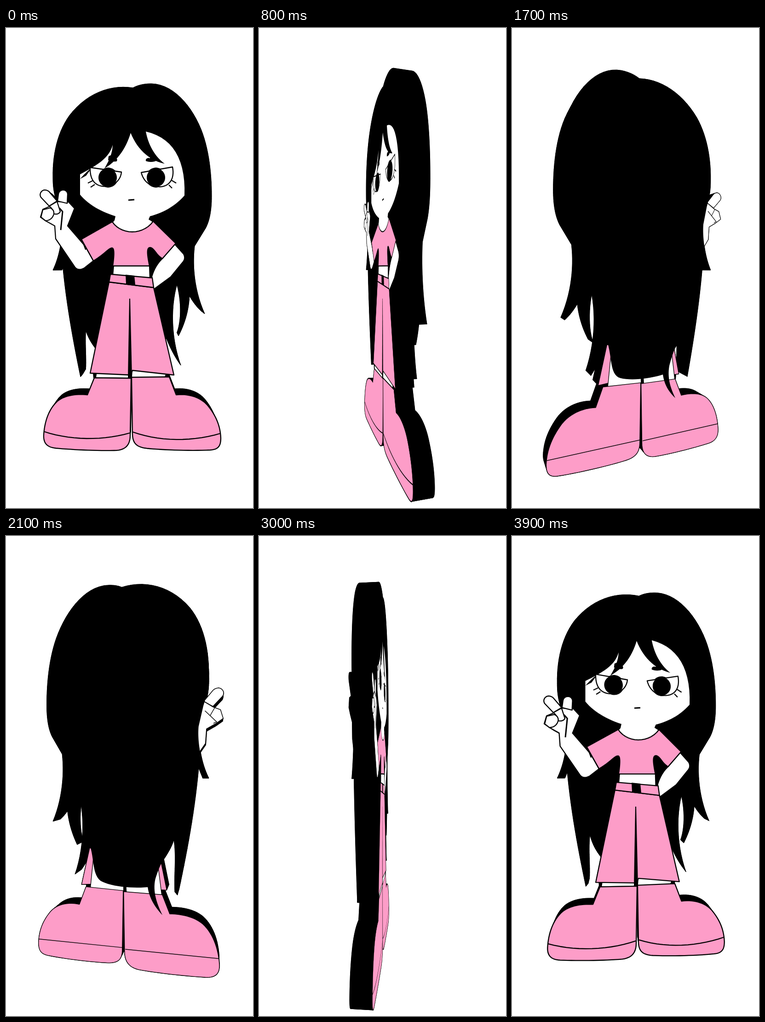
These frames come from a looping animation (537 by 1043 pixels, 4 s). An HTML page with a canvas:

```html
<!DOCTYPE html>
<html lang="en">
<head>
<meta charset="utf-8">
<title>Turntable girl</title>
<style>
  html, body { margin: 0; width: 100%; height: 100%; overflow: hidden; background: #fff; }
  canvas { display: block; }
</style>
</head>
<body>
<canvas width="537" height="1043"></canvas>
<script>
const canvas = document.querySelector('canvas');
const ctx = canvas.getContext('2d');
const W = 537, H = 1043, CX = W / 2, CY = H / 2;
const FOCAL = 768, DEPTH = 38;            // camera distance, thickness of the figure
const START = 2.6, STEP = 9.08;           // degrees, degrees per step
const FRAME_MS = 100, FRAMES = 40;
const PINK = '#fd9dc8', WHITE = '#fff', BLACK = '#000';
const LINE = 2.3, THIN = 1.3;

const pose = degrees => {
  const a = degrees * Math.PI / 180;
  return { cos: Math.cos(a), sin: Math.sin(a) };
};

function project([x, y], z, { cos, sin }) {
  const s = FOCAL / (FOCAL - x * sin - z * cos);
  return [CX + (x * cos - z * sin) * s, CY + y * s, s];
}

// Screen point at a known pose -> point on the flat plane at depth z.
function unproject([px, py], z, { cos, sin }) {
  const X = px - CX;
  const x = (X * (FOCAL - z * cos) + FOCAL * z * sin) / (FOCAL * cos + X * sin);
  return [x, (py - CY) * (FOCAL - x * sin - z * cos) / FOCAL];
}

const mix = (p, q, t) => [p[0] + (q[0] - p[0]) * t, p[1] + (q[1] - p[1]) * t];

function bezier(points, t) {
  while (points.length > 1) points = points.slice(1).map((q, i) => mix(points[i], q, t));
  return points[0];
}

// Turns absolute M, L, Q, C path data into a polyline.
function flatten(d) {
  const out = [];
  for (const [, cmd, args] of d.matchAll(/([MLQC])([^MLQC]*)/g)) {
    const n = args.trim().split(/[ ,]+/).map(Number);
    const size = { M: 1, L: 1, Q: 2, C: 3 }[cmd];
    const pts = [];
    for (let i = 0; i < n.length; i += 2) pts.push([n[i], n[i + 1]]);
    for (let i = 0; i < pts.length; i += size) {
      if (size === 1) { out.push(pts[i]); continue; }
      const curve = [out.at(-1), ...pts.slice(i, i + size)];
      for (let k = 1; k <= 14; k++) out.push(bezier(curve, k / 14));
    }
  }
  return out;
}

const frontPose = pose(START), backPose = pose(START + 17 * STEP);
const front = d => flatten(d).map(p => unproject(p, 0, frontPose));
const back = d => flatten(d).map(p => unproject(p, -DEPTH, backPose));

function circle(cx, cy, r) {
  const pts = Array.from({ length: 40 }, (_, i) => {
    const a = i * Math.PI / 20;
    return `${cx + r * Math.cos(a)} ${cy + r * Math.sin(a)}`;
  });
  return 'M' + pts.join('L');
}

// Shapes shared by both faces
const hair = front(`M276 130 C287 124 300 121 316 121 C362 122 402 166 424 220
  C442 265 447 320 447 365 C447 395 443 418 434 435 L410 474
  C405 515 409 570 432 621 Q415 607 399 577 Q398 625 375 669
  C386 640 385 590 373 553 C357 605 359 675 380 733 Q362 708 349 675
  L195 697 Q174 670 170 642 C163 675 169 720 167 752 L162 758
  C146 680 130 595 122 503 L113 526 L102 526
  Q112 505 117 480 Q123 450 121 425 L112 385 C104 360 102 345 102 325
  C101 275 112 226 138 190 C174 143 226 122 276 130`);
const arm = front(`M108 458 L148 517 Q156 530 171 521 L190 506 L172 474 L134 430
  L149 392 L136 378 L110 377 L94 388 L80 394 L75 411 L88 420 L106 430`);
const leftFinger = front('M94 387 L76 368 C71 360 78 352 84 352 Q90 352 94 356 L111 376');
const rightFinger = front('M112 376 L114 361 C116 349 133 349 134 361 L133 381');
const thumb = front('M76 411 L80 395 L96 391 Q105 395 104 404 Q101 415 91 418 L86 419');
const knuckle = front('M94 387 L111 377 L118 399 Q114 406 104 404 Q103 394 94 387');
const rightArm = front('M367 470 L386 491 Q391 500 385 508 L358 541 L321 568 L317 540 Q324 516 340 501');
const pants = front('M224 552 L321 564 L365 754 L275 744 L271 754 L183 750');
const legs = front('M190 748 L355 752 L353 760 L191 760');
const leftShoe = front(`M192 760 L272 761 L270 885 C270 906 260 918 235 918
  C195 919 140 916 108 913 C89 911 81 902 82 884 C84 852 95 825 113 810
  C130 797 155 795 177 797`);
const rightShoe = front(`M273 759 L355 758 L370 797 C398 794 425 803 440 822
  C459 846 466 868 467 891 C467 909 461 916 444 917 C405 919 345 917 312 914
  C285 912 276 904 275 884`);

const solid = [hair, arm, leftFinger, rightFinger, rightArm, pants, legs, leftShoe, rightShoe];

// Each layer: points, fill, stroke width
const fill = (d, color, width = 0) => [front(d), color, width];
const line = (d, width = LINE) => [front(d), null, width];
const backLine = d => [back(d), null, THIN];

const frontArt = [
  [hair, BLACK, 0],
  fill(`M271 228 C262 258 245 287 214 305 C225 287 231 272 232 254
    C224 284 196 299 161 318 L161 362 C178 383 206 399 238 409 L236 418 L231 424
    L250 450 L300 450 L318 421 L310 416 L313 409 C340 402 367 388 388 364
    C391 285 362 238 304 225 C309 252 322 278 345 295 C308 287 284 260 271 228`, WHITE),
  fill('M188 302 Q175 312 161 328 L174 321', BLACK),
  fill('M222 287 Q230 291 240 290 C244 286 240 281 236 283 C237 276 230 274 223 279', BLACK),
  fill('M304 289 C303 284 308 281 313 283 C313 275 321 276 322 283 Q324 287 326 289 Q315 293 304 289', BLACK),
  fill(circle(222, 325, 20.5), WHITE, LINE),
  fill('M183 303 L251 313 C249 333 232 345 211 344 C190 342 182 325 183 303', WHITE, LINE),
  fill(circle(221, 325, 20), BLACK),
  fill(circle(326, 325, 20.5), WHITE, LINE),
  fill('M294 314 L362 302 C367 327 356 344 335 345 C312 345 299 333 294 314', WHITE, LINE),
  fill(circle(326, 325, 20), BLACK),
  line('M188 332 L178 337'), line('M193 340 L184 346'),
  line('M360 331 L370 337'), line('M354 341 L361 348'),
  line('M266 374 L279 373', 3),
  [arm, WHITE, LINE],
  [rightArm, WHITE, LINE],
  [leftFinger, WHITE, LINE], [rightFinger, WHITE, LINE],
  [knuckle, WHITE, LINE], [thumb, WHITE, LINE],
  line('M116 391 L123 399 L119 439', 3),
  fill('M165 460 L173 481 L172 472', BLACK, LINE),
  fill('M234 515 L232 537 L313 543 L312 515', WHITE, LINE),
  fill(`M231 421 C250 450 298 451 320 420 L369 468 L340 501
    C326 493 323 479 314 477 C305 476 307 492 312 517
    L232 517 C235 496 236 479 231 478 C224 477 214 492 190 506 L164 459`, PINK, LINE),
  [legs, BLACK, LINE],
  fill('M198 746 L267 746 L269 760 L196 759', WHITE),
  fill('M275 743 L348 750 L345 758 L274 759', WHITE),
  [pants, PINK, LINE],
  fill('M227 535 L318 543 L321 564 L224 552', PINK, LINE),
  fill('M260 536 L279 538 L281 558 L261 556', BLACK),
  [leftShoe, PINK, LINE], [rightShoe, PINK, LINE],
  fill('M268 588 L270 588 L274 760 L265 760', BLACK),
  line('M83 877 C140 896 210 897 269 880'),
  line('M276 878 C335 899 405 899 466 881'),
];

const backArt = [
  [arm, WHITE, THIN],
  [leftFinger, WHITE, THIN], [rightFinger, WHITE, THIN],
  backLine('M426 398 L444 421 L439 423'),
  backLine('M434 408 L441 394'),
  [pants, PINK, THIN],
  [back('M217 690 L208 782 L354 765 L346 695'), WHITE, THIN],
  [back('M280 755 L286 755 L287 775 L280 775'), BLACK, 0],
  [leftShoe, PINK, THIN], [rightShoe, PINK, THIN],
  backLine('M76 940 L279 895'),
  backLine('M284 897 L447 860'),
  [hair, BLACK, 0],
  [back(`M200 640 L208 685 C217 715 213 748 231 759 C252 768 300 762 328 753
    C331 775 341 791 355 804 C342 778 338 756 342 734 Q349 706 362 678 L365 600`), BLACK, 0],
];

function trace(points) {
  ctx.beginPath();
  for (const [x, y] of points) ctx.lineTo(x, y);
}

// The pen is squeezed by the same perspective as the shape it outlines.
function strokeInPerspective(points, z, view, width) {
  const xs = points.map(p => p[0]), ys = points.map(p => p[1]);
  const x = (Math.min(...xs) + Math.max(...xs)) / 2;
  const y = (Math.min(...ys) + Math.max(...ys)) / 2;
  const p = project([x, y], z, view), q = project([x + 1, y], z, view);
  ctx.save();
  ctx.setTransform(q[0] - p[0], q[1] - p[1], 0, p[2], 0, 0);
  ctx.lineWidth = width;
  ctx.stroke();
  ctx.restore();
}

function drawFace(art, z, view) {
  for (const [points, color, width] of art) {
    trace(points.map(p => project(p, z, view)));
    if (color) {
      ctx.closePath();
      ctx.fillStyle = color;
      ctx.fill();
    }
    if (width) strokeInPerspective(points, z, view, width);
  }
}

function drawSolid(view) {
  ctx.fillStyle = BLACK;
  ctx.lineWidth = 0.7;
  for (const shape of solid) {
    const near = shape.map(p => project(p, 0, view));
    const far = shape.map(p => project(p, -DEPTH, view));
    const sides = near.map((p, i) => {
      const j = (i + 1) % near.length;
      return [p, near[j], far[j], far[i]];
    });
    for (const polygon of [near, far, ...sides]) {
      trace(polygon);
      ctx.closePath();
      ctx.fill();
      ctx.stroke();
    }
  }
}

function draw(now) {
  const frame = Math.floor(now / FRAME_MS) % FRAMES;
  const view = pose(START + STEP * frame);
  ctx.fillStyle = WHITE;
  ctx.fillRect(0, 0, W, H);
  ctx.strokeStyle = BLACK;
  ctx.lineJoin = 'round';
  drawSolid(view);
  if (view.cos > 0) drawFace(frontArt, 0, view);
  else if (FOCAL * view.cos < -DEPTH) drawFace(backArt, -DEPTH, view);
}

const begin = performance.now();
function tick() {
  draw(performance.now() - begin);
  requestAnimationFrame(tick);
}
tick();
</script>
</body>
</html>
```
